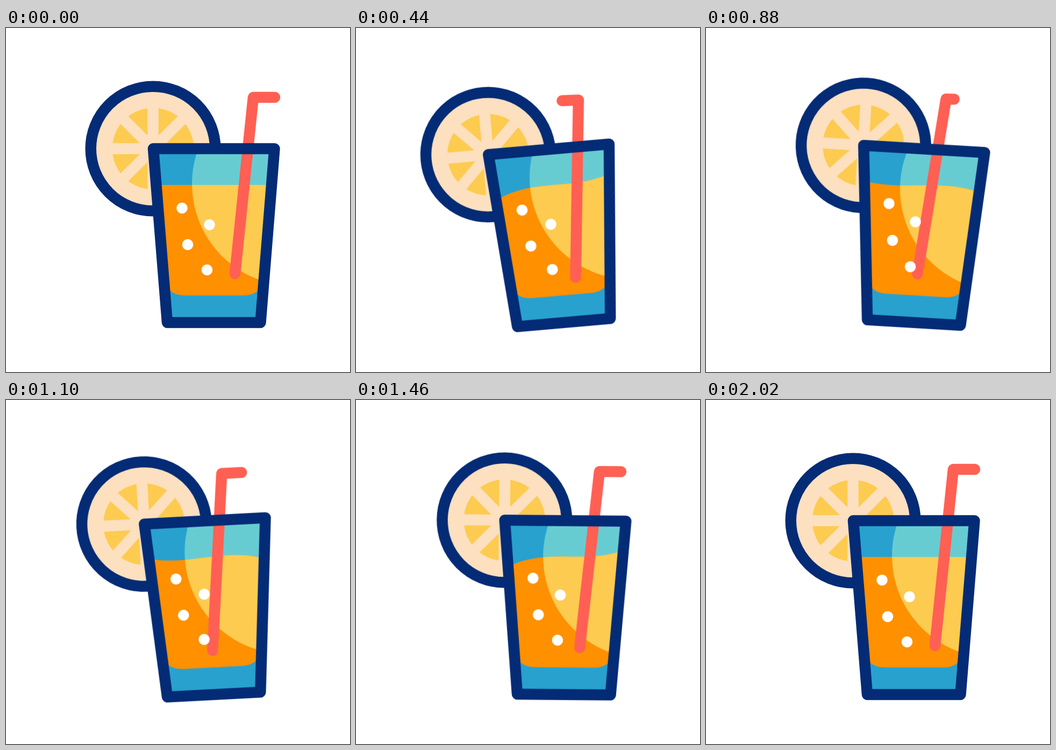
Recreate the animation shown at these times as an HTML page without scripts. Size 640 by 640 pixels, loop 2220 ms.

```html
<!DOCTYPE html>
<html lang="en">
<head>
<meta charset="utf-8">
<title>Swinging drink</title>
<style>
  html, body { margin: 0; width: 100%; height: 100%; overflow: hidden; background: #fff; }
  svg { display: block; width: 100%; height: 100%; }

  :root {
    --navy: #042b75;
    --peel: #fce0bf;
    --lemon: #fdcb50;
    --coral: #ff6053;
  }

  .drink, .shift, .bob, .straw, .liquid, .bubbles {
    animation: 2220ms cubic-bezier(.333, 0, .667, 1) infinite;
  }
  .drink { transform-origin: 387px 548px; animation-name: swing; }
  .shift { animation-name: shift; }
  .bob { animation-name: bob; }
  .straw { animation-name: twist; }
  .liquid { animation-name: slosh; }
  .bubbles { animation-name: rise; }

  .line { fill: none; stroke-width: 20.5; stroke-linecap: round; stroke-linejoin: round; }
  .navy { stroke: var(--navy); }
  .straw { stroke: var(--coral); }

  /* damped swing of the whole glass */
  @keyframes swing {
    0%, 90.99%, 100% { transform: rotate(0deg); }
    20.27% { transform: rotate(-5deg); }
    37.39% { transform: rotate(4deg); }
    50% { transform: rotate(-3deg); }
    60.36% { transform: rotate(2deg); }
    71.17% { transform: rotate(-1deg); }
  }
  /* straw: sideways, up and down, and turning tip */
  @keyframes shift {
    0%, 7.66%, 76.58%, 100% { transform: translateX(0); }
    44.6% { transform: translateX(-40px); }
  }
  @keyframes bob {
    0%, 38.29%, 74.77%, 100% { transform: translateY(0); }
    15.32%, 52.25% { transform: translateY(10px); }
  }
  @keyframes twist {
    0%, 54.05%, 100% { d: path("M426 457 L460 129 L500 129"); }
    18.02% { d: path("M426 457 L460 129 L429 127.5"); }
  }
  @keyframes slosh {
    0%, 90.09%, 100% { d: path("M286 292 C353 292 421 292 488 292 L475 483 Q462 497.5 443 497.5 L332 497.5 Q312 497.5 299 483 Z"); }
    22.52%, 67.57% { d: path("M286 309 C353 276.4 421 303.7 488 281 L475 483 Q462 497.5 443 497.5 L332 497.5 Q312 497.5 299 483 Z"); }
    45.05% { d: path("M286 289 C353 308 421 275 488 300.5 L475 483 Q462 497.5 443 497.5 L332 497.5 Q312 497.5 299 483 Z"); }
  }
  @keyframes rise {
    0%, 90.09%, 100% { transform: translateY(0); }
    45.05% { transform: translateY(-5.5px); }
  }
</style>
</head>
<body>
<svg viewBox="0 0 640 640" xmlns="http://www.w3.org/2000/svg">
  <defs>
    <path id="cup" d="M274 224.5 H499.5 L473.5 548 H300 Z"/>
    <circle id="shine" cx="536" cy="290" r="190"/>
    <clipPath id="inCup"><use href="#cup"/></clipPath>
    <clipPath id="inLiquid">
      <path class="liquid" d="M286 292 C353 292 421 292 488 292 L475 483 Q462 497.5 443 497.5 L332 497.5 Q312 497.5 299 483 Z"/>
    </clipPath>
  </defs>

  <g class="drink">
    <g transform="translate(273.5 224.5)">
      <circle class="line navy" r="115.8" style="fill: var(--peel)"/>
      <circle r="75.8" fill="var(--lemon)"/>
      <path d="M-78 0 H78 M0 -78 V78 M-55 -55 L55 55 M-55 55 L55 -55" stroke="var(--peel)" stroke-width="20.5"/>
    </g>

    <g clip-path="url(#inCup)">
      <use href="#cup" fill="#28a1cf"/>
      <use href="#shine" fill="#67ccd2"/>
      <g clip-path="url(#inLiquid)">
        <rect x="260" y="250" width="250" height="260" fill="#ff9000"/>
        <use href="#shine" fill="var(--lemon)"/>
      </g>
    </g>

    <g class="shift">
      <g class="bob">
        <path class="line straw" d="M426 457 L460 129 L500 129"/>
      </g>
    </g>

    <g class="bubbles" fill="#fff">
      <circle cx="327.5" cy="335" r="10.3"/>
      <circle cx="378.5" cy="366" r="10.3"/>
      <circle cx="338" cy="403" r="10.3"/>
      <circle cx="374" cy="450" r="10.3"/>
    </g>

    <use href="#cup" class="line navy"/>
  </g>
</svg>
</body>
</html>
```
